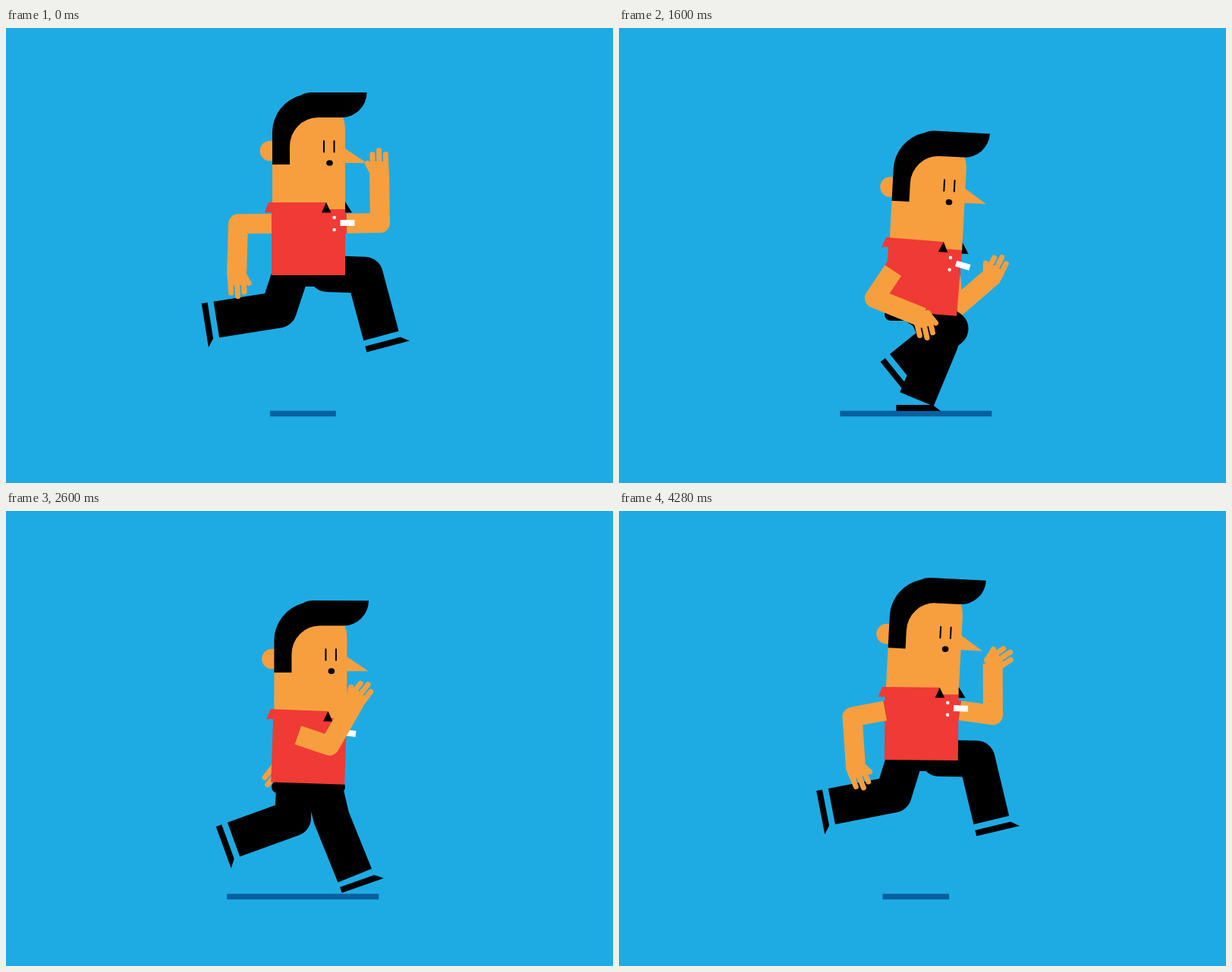
Recreate the animation shown at these times as an HTML page with a canvas. Size 800 by 600 pixels, loop 4320 ms.

```html
<!DOCTYPE html>
<html>
<head>
<meta charset="utf-8">
<style>
html, body { margin: 0; width: 100%; height: 100%; overflow: hidden; background: #1eabe4; }
canvas { display: block; }
</style>
</head>
<body>
<canvas id="stage" width="800" height="600"></canvas>
<script>
const c = document.getElementById('stage').getContext('2d');
const SKY = '#1eabe4', SKIN = '#f79f3f', RED = '#f03a35', SHADOW = '#0760a0';
const STEP = 40, CYCLE = 18, ANKLE_FLOOR = 489.5;
const rad = d => d * Math.PI / 180;
const cosd = d => Math.cos(rad(d));
const sind = d => Math.sin(rad(d));
const move = ([x, y], deg, len) => [x + len * cosd(deg), y + len * sind(deg)];

// Smooth periodic curve through [time, value] keys.
function curve(...keys) {
  const n = keys.length;
  const key = i => {
    const turn = Math.floor(i / n), [t, v] = keys[i - turn * n];
    return [t + turn * CYCLE, v];
  };
  const slope = i => {
    const [t0, v0] = key(i - 1), [t1, v1] = key(i + 1);
    return (v1 - v0) / (t1 - t0);
  };
  return time => {
    const t = time % CYCLE;
    let i = n - 1;
    while (key(i)[0] > t) i--;
    const [t0, v0] = key(i), [t1, v1] = key(i + 1);
    const d = t1 - t0, u = (t - t0) / d, w = 1 - u;
    return v0 * (1 + 2 * u) * w * w + v1 * u * u * (3 - 2 * u)
      + d * u * w * (slope(i) * w - slope(i + 1) * u);
  };
}

// A stride: reach, land, pass, push off, trail, swing through.
const thigh = curve([0, 2], [2, 77], [4, 66], [8, 107], [11, 93], [13, 33.5], [17, 1]);
const shin = curve([0, 75], [2, 68], [4, 112], [8, 169], [11, 160], [13, 141], [17, 76.6]);

// Elbow and wrist angles are relative to the part before them.
const near = {
  shoulder: n => 94 + 87 * cosd(n * 20 - 10),
  elbow: n => -88 - 14 * sind(n * 20),
  wrist: n => 18 - 23 * cosd(n * 20) + 42 * sind(n * 20)
};
const far = {
  shoulder: n => 110 - 111 * cosd(n * 20 - 3),
  elbow: curve([0, -90], [4, -126], [11, -97], [17, -98]),
  wrist: curve([0, 0], [4, -22], [11, 27], [17, 57])
};

const hair = new Path2D('M351 180V137A51 51 0 0 1 389 88.5Q395 85 402 85H475.5A33 33 0 0 1 442.5 118H411A37 38 0 0 0 374 156V180Z');
const face = new Path2D('M351 244V140Q360 110 400 105H442L444 118Q447 125 447 135V159L475.5 178H447V242Z');
const shirt = new Path2D('M346 230H422L425 239H447V326H350V243H341Z');
const collar = new Path2D('M422 230L428.5 243.5H416ZM447 229L456 243.5H447Z');
const shoe = new Path2D('M-24 0H24L34.5 8H-24Z');

function fill(color, path) {
  c.fillStyle = color;
  c.fill(path);
}
function rect(color, x, y, w, h, r = 0) {
  c.fillStyle = color;
  c.beginPath();
  c.roundRect(x, y, w, h, r);
  c.fill();
}
function oval(color, x, y, rx, ry = rx) {
  c.fillStyle = color;
  c.beginPath();
  c.ellipse(x, y, rx, ry, 0, 0, 7);
  c.fill();
}
function line(color, width, points, cap = 'butt') {
  c.strokeStyle = color;
  c.lineWidth = width;
  c.lineCap = cap;
  c.lineJoin = 'round';
  c.beginPath();
  points.forEach(p => c.lineTo(...p));
  c.stroke();
}
function placed([x, y], deg, draw) {
  c.save();
  c.translate(x, y);
  c.rotate(rad(deg));
  draw();
  c.restore();
}

function hand() {
  rect(SKIN, -8, -12.5, 21, 25, 5);
  for (const i of [-1, 0, 1]) line(SKIN, 7, [[5, i * 8.8], [27.5 - 5 * i * i, i * 8.8]], 'round');
  line(SKIN, 7, [[-2, -9], [11, -15.5]], 'round');
}

function arm(pose, n, shoulder) {
  const a = pose.shoulder(n), b = a + pose.elbow(n);
  const elbow = move(shoulder, a, 61), wrist = move(elbow, b, 68);
  const cuff = move(shoulder, a, 17);
  line(SKIN, 26, [cuff, elbow, wrist]);
  oval(RED, ...shoulder, 13);
  line(RED, 26, [shoulder, cuff]);
  placed(wrist, b + pose.wrist(n), hand);
}

function leg(n, drop, reach) {
  const angle = shin(n) - reach;
  const hip = [399 + 24 * cosd(n * 20), 324 + drop];
  const knee = move(hip, thigh(n), 50), ankle = move(knee, angle, 83);
  ankle[1] = Math.min(ankle[1], ANKLE_FLOOR);
  oval('#000', ...hip, 24);
  line('#000', 48, [hip, knee, ankle]);
  // The sole flattens as it nears the floor.
  const lift = Math.min(1, (ANKLE_FLOOR - ankle[1]) / 10);
  placed(move(ankle, angle, 8), (angle - 90) * lift, () => fill('#000', shoe));
}

function head() {
  c.translate(-398, -235);
  oval(SKIN, 348, 162, 13.3);
  fill(SKIN, face);
  fill('#000', hair);
  for (const x of [419, 432.5]) line('#000', 2, [[x, 149], [x, 163.5]], 'round');
  oval('#000', 426.5, 178, 4.3, 3.8);
}

function torso(tilt) {
  c.translate(-398, -326);
  fill(RED, shirt);
  fill('#000', collar);
  for (const y of [250, 266]) oval('#fff', 432.7, y, 2.3);
  placed([440.5, 257], tilt * 2.6, () => rect('#fff', 0, -4, 19, 8));
}

function draw(n) {
  // The body rises and falls once per step, twice per stride.
  const a = n * 40, sway = 1 - cosd(a), twice = 1 - cosd(2 * a);
  const drop = 21.4 * sway + 8.2 * sind(a) + 2.7 * twice;
  const tilt = 2.4 * sway;
  const nod = 2 * sway - 3 * sind(a) + 0.7 * twice;
  const waist = [398 - 0.4 * tilt, 326 + drop + 2.5 * sway];
  const onTorso = (x, y) => move(move(waist, tilt, x - 398), tilt + 90, y - 326);
  const shade = Math.min(200, 87 + 0.14 * drop * drop);
  const reach = 48 * Math.max(0, -cosd(n * 20) - 0.77);

  rect(SKY, 0, 0, 800, 600);
  rect(SHADOW, 391.3 - shade / 2, 504.7, shade, 7.6);
  arm(far, n, onTorso(432, 258));
  placed(onTorso(398, 235), nod, head);
  leg(n + 9, drop, reach);
  leg(n, drop, 0);
  rect('#000', 350, 325 + drop, 97, 16, 8);
  placed(waist, tilt, () => torso(tilt));
  arm(near, n, onTorso(367, 258));
}

function tick() {
  draw(Math.floor(performance.now() / STEP) % CYCLE);
  requestAnimationFrame(tick);
}
tick();
</script>
</body>
</html>
```
